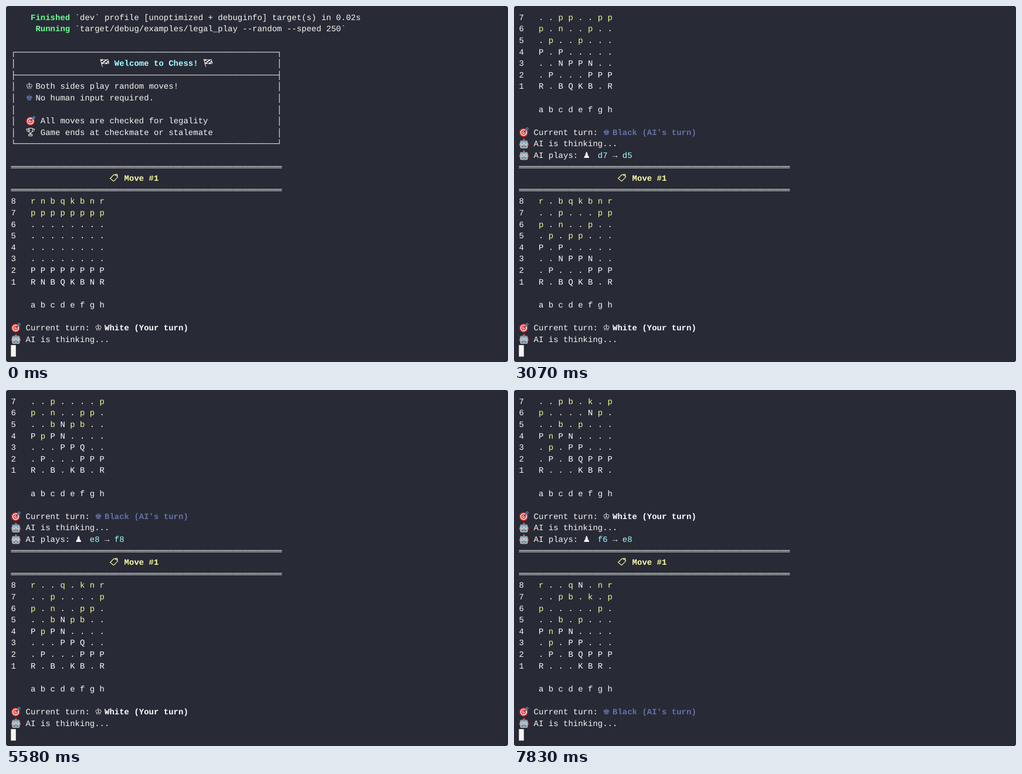
Animation, 856 px wide and 607 px high, one loop 8000 ms. Source, as an HTML page with a canvas:

```html
<!DOCTYPE html>
<html lang="en">
<head>
<meta charset="utf-8">
<title>Terminal chess</title>
<style>
  html, body { margin: 0; width: 100%; height: 100%; overflow: hidden; background: #fff; }
  canvas { display: block; }
</style>
</head>
<body>
<canvas id="screen" width="856" height="607"></canvas>
<script>
const ctx = document.getElementById('screen').getContext('2d');
const CELL = 8.4, ROW = 19.6, ROWS = 30, LOOP = 8000;
const BG = '#282a36', FG = '#f8f8f2', WHITE = '#ffffff', GREEN = '#69ff94', CYAN = '#a4ffff',
      YELLOW = '#f1fa8c', BRIGHT = '#ffffa5', MUTED = '#6272a4', RED = '#ff6e6e';

// Icons, drawn from the top left of a two-cell box
function disc(x, y, r, color) {
  ctx.fillStyle = color;
  ctx.beginPath();
  ctx.arc(x, y, r, 0, 7);
  ctx.fill();
}
function box(x, y, w, h, r, color) {
  ctx.fillStyle = color;
  ctx.beginPath();
  ctx.roundRect(x, y, w, h, r);
  ctx.fill();
}
function stroke(d, color, width = 1) {
  ctx.strokeStyle = color;
  ctx.lineWidth = width;
  ctx.stroke(new Path2D(d));
}
const icons = {
  target() {
    [[7.4, '#d5302f'], [5.6, '#f5f5f5'], [4, '#d5302f'], [2.2, '#f5f5f5'], [1, '#d5302f']]
      .forEach(([r, color]) => disc(8, 10, r, color));
    stroke('M8 10L13 5', '#37474f', 1.3);
    stroke('M12 6L12.6 3.2L15 1.4M12 6L14.6 5.4L16.4 3', '#4a90c2', 1.5);
  },
  robot() {
    box(.4, 8, 16.2, 5, 1.5, '#c94f4a');
    box(7.6, 1.5, 1.8, 4, .5, '#78909c');
    disc(8.5, 2.3, 1.4, '#e05a50');
    box(2, 4, 13, 13.4, 2.5, '#a9bfc9');
    box(2, 4, 13, 3, 2, '#78a0b4');
    for (const x of [5.4, 11.6]) {
      disc(x, 9, 2, '#f5f5f5');
      disc(x, 9, 1.1, '#c62828');
    }
    box(7.9, 10.4, 1.2, 1.8, .5, '#546e7a');
    box(4.5, 13.2, 8, 2.4, 1, '#37474f');
    stroke('M6 14.4H11', '#eceff1', 1);
  },
  flag(color) {
    stroke('M1.2 2.4L4.8 15.4M1.6 3.4C5 1.6 8 5.6 14 2.8L16 9.4C11 12 8 8.2 3.6 10.4', color, 1);
    ctx.fillStyle = color;
    for (let i = 0; i < 12; i++) {
      const row = i >> 2, x = 2.4 + (i & 3) * 3.2 + row * .6, y = 3.2 + row * 2.3 + (i & 3) * .15;
      if ((i + row) % 2 === 0) ctx.fillRect(x, y, 3, 2.2);
    }
  },
  tag(color) {
    stroke('M1.2 9.8L7.6 3.4L13.2 3L14 7.6L7.2 14.6ZM9.6 3.2L11.4 5.2L13.6 5.4', color, 1.1);
  },
  cup(color) {
    stroke('M4.6 2.6H11.6V6.4Q11.4 10 8.1 10.6Q4.8 10 4.6 6.4ZM4.6 4H1.2Q1 8 5.2 8.6M11.6 4H15Q15.2 8 11 8.6' +
      'M7.2 10.6V13H9V10.6M5 13H11.2V15.6H5Z', color, 1);
    stroke('M6.4 4V8', color, 1.2);
  },
  siren() {
    stroke('M2 6L.6 5M4 3.4L3 1.6M8.5 2.6V.8M13 3.4L14 1.6M15 6L16.4 5', '#f4a09a', 1.2);
    box(3.4, 4, 10.2, 11, [4.5, 4.5, 0, 0], '#e53935');
    disc(8.5, 9.2, 2.4, '#ffb4a8');
    box(1.4, 13.4, 14.2, 3.6, 1, '#8fa3ad');
  },
  retry() {
    box(.6, 1.4, 15.8, 15.8, 2.2, '#5b9fc4');
    stroke('M3.6 9.4A4.9 4.9 0 0 1 12 6M13.4 9.2A4.9 4.9 0 0 1 5 12.6', '#fff', 1.6);
    ctx.fillStyle = '#fff';
    ctx.fill(new Path2D('M13.6 3.6V8H9.2ZM3.4 15V10.6H7.8Z'));
  }
};

// A line is a list of [column, text, color, bold]; a text of the form ":name" is an icon
const log = [
  [[4, 'Finished', GREEN, true], [13, '`dev` profile [unoptimized + debuginfo] target(s) in 0.02s']],
  [[5, 'Running', GREEN, true], [13, '`target/debug/examples/legal_play --random --speed 250`']],
  [],
  rule('┌', '┐'),
  framed([18, ':flag'], [21, 'Welcome to Chess!', CYAN, true], [39, ':flag']),
  rule('├', '┤'),
  framed([3, '♔'], [5, 'Both sides play random moves!']),
  framed([3, '♚', MUTED], [5, 'No human input required.']),
  framed(),
  framed([3, ':target'], [6, 'All moves are checked for legality']),
  framed([3, ':cup'], [6, 'Game ends at checkmate or stalemate']),
  rule('└', '┘'),
  []
];
function rule(left, right) { return [[0, left + '─'.repeat(53) + right]]; }
function framed(...parts) { return [[0, '│'], ...parts, [54, '│']]; }

const board = [...'rnbqkbnrpppppppp' + '.'.repeat(32) + 'PPPPPPPPRNBQKBNR'];
const square = name => (8 - name[1]) * 8 + name.charCodeAt(0) - 97;
const pieceColor = p => p === '.' ? FG : p < 'a' ? WHITE : YELLOW;

function logTurn(whiteToMove) {
  const double = [[0, '═'.repeat(55)]];
  log.push(double, [[20, ':tag', BRIGHT], [23, 'Move #1', BRIGHT, true]], double);
  for (let r = 0; r < 8; r++) {
    const pieces = board.slice(r * 8, r * 8 + 8);
    log.push([[0, String(8 - r)], ...pieces.map((p, i) => [4 + 2 * i, p, pieceColor(p)])]);
  }
  const [king, label, color] = whiteToMove ? ['♔', 'White (Your turn)', WHITE] : ['♚', "Black (AI's turn)", MUTED];
  log.push([], [[4, 'a b c d e f g h']], [],
    [[0, ':target'], [3, 'Current turn:'], [17, king, color], [19, label, color, true]],
    [[0, ':robot'], [3, 'AI is thinking...']]);
}
function logPlay(label, from, to) {
  const col = 4 + label.length;
  log.push([[0, ':robot'], [3, label], [col, '♟'], [col + 3, from, CYAN], [col + 6, '→'], [col + 8, to, CYAN]]);
}
function logIllegal(from, to) {
  logPlay('AI plays:', from, to);
  log.push([[0, 'Failed: does_not_leave_king_in_check']], [],
    [[0, ':siren'], [3, 'AI MOVE ERROR:', RED, true], [18, `Move PieceMove(${from} -> ${to} - None) is not legal`]],
    [[0, '⚠'], [3, 'This indicates a bug in the move generation.']],
    [[0, ':retry'], [3, 'AI will try a different move...']], []);
}

const moves = ('e2e3 a7a6 g1f3 b8c6 c2c4 b7b5 d2d3 f7f6 a2a4 e7e5 b1c3 d7d5 c3d5 b5b4 f3d4 f8c5 ' +
  'd4e6 g7g6 e6d4 c8f5 d1f3 e8f8 c1d2 f5d7 h1g1 b4b3 d5f6 f8f7 f3e2 c6b4 f6e8').split(' ');
const illegal = { 13: ['e8', 'e7'], 25: ['f8', 'e7'] };

logTurn(true);
const ends = [log.length];   // log length after each move
moves.forEach((move, i) => {
  const from = move.slice(0, 2), to = move.slice(2);
  if (illegal[i]) logIllegal(...illegal[i]);
  logPlay(illegal[i] ? 'AI plays (retry):' : 'AI plays:', from, to);
  board[square(to)] = board[square(from)];
  board[square(from)] = '.';
  logTurn(i % 2 === 1);
  ends.push(log.length);
});

function drawPart([col, text, color = FG, bold], row) {
  const x = CELL * (col + 1), top = ROW * (row + .5);
  if (text[0] === ':') {
    ctx.save();
    ctx.translate(x, top);
    icons[text.slice(1)](color);
    ctx.restore();
    return;
  }
  ctx.font = `${bold ? 'bold ' : ''}14px "Liberation Mono", "DejaVu Sans", monospace`;
  ctx.fillStyle = color;
  ctx.fillText(text, x, top + 14);
}

function draw(step) {
  ctx.clearRect(0, 0, 856, 607);
  box(0, 0, 856, 607, 4, BG);
  log.slice(ends[step] - ROWS + 1, ends[step])
    .forEach((line, row) => line.forEach(part => drawPart(part, row)));
  ctx.fillStyle = FG;
  ctx.fillRect(CELL, ROW * (ROWS - .5), CELL, ROW);
}

const startOf = step => step && 70 + 250 * step + (step > 16 ? 10 : 0);
ctx.textRendering = 'geometricPrecision';
let shown = -1;
function tick() {
  const t = performance.now() % LOOP;
  let step = moves.length;
  while (startOf(step) > t) step--;
  if (step !== shown) draw(shown = step);
  requestAnimationFrame(tick);
}
tick();
</script>
</body>
</html>
```
